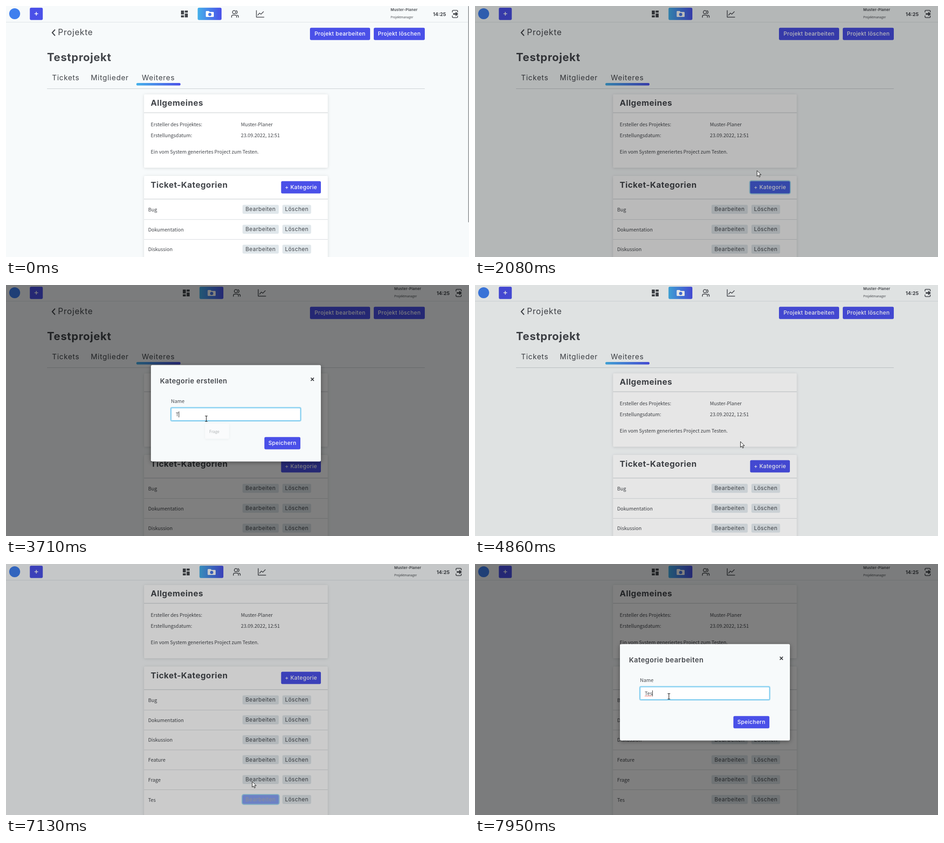
Animation of 1016 by 551 pixels, one loop 8000 ms. Source, as an HTML page:

```html
<!DOCTYPE html>
<html lang="de">
<head>
<meta charset="utf-8">
<title>Ticket-Kategorien</title>
<style>
  html, body { margin: 0; width: 100%; height: 100%; overflow: hidden; background: #f7fafb; }
  svg { display: block; width: 100%; height: 100%; }
  text { font-family: Inter, sans-serif; fill: #43464b; letter-spacing: .05em; white-space: pre; }
  .body { font-family: "Noto Sans CJK JP", "Noto Sans CJK SC", "Noto Sans CJK", "Noto Sans", sans-serif; letter-spacing: 0; }
  .bold { font-weight: 700; letter-spacing: .03em; }
  .semi { font-weight: 600; letter-spacing: .036em; }
  .mid { text-anchor: middle; font-weight: 500; letter-spacing: .03em; }
  .small { text-anchor: middle; letter-spacing: .04em; }
  .white { fill: #fff; }
  .card { fill: #fff; filter: drop-shadow(0 1px 3px rgba(0,0,0,.13)); }
  .primary { fill: #4a50e8; }
  .soft { fill: #e0e7eb; }
  .rule { fill: #d6dadc; }
  .glow { fill: none; stroke: #45b5e8; stroke-opacity: .5; stroke-width: 2; }
  .icon { fill: none; stroke: #43464b; stroke-width: 1.5; stroke-linecap: round; stroke-linejoin: round; }
  .pointer { fill: #fff; stroke: #111; stroke-width: 1; stroke-linejoin: round; }
</style>
</head>
<body>
<svg id="stage" viewBox="0 0 1016 551"></svg>
<script>
const rect = (x, y, w, h, cls, r = 0, more = '') =>
  `<rect x="${x}" y="${y}" width="${w}" height="${h}" rx="${r}" class="${cls}" ${more}/>`;
const label = (x, y, size, str, cls = '', more = '') =>
  `<text x="${x}" y="${y}" font-size="${size}" class="${cls}" ${more}>${str}</text>`;
const body = (x, y, str, size = 10.7) => label(x, y, size, str, 'body');
const button = (x, y, w, h, str, id = '') =>
  rect(x, y, w, h, 'primary', 3, id && `id="${id}"`) + label(x + w / 2, y + h / 2 + 4, 12, str, 'mid white');

const categories = ['Bug', 'Dokumentation', 'Diskussion', 'Feature', 'Frage', 'Tes'];
const row = (name, i) => {
  const y = 446.4 + i * 43.7, last = i === 5;
  return `<g ${last ? 'id="newRow"' : ''}>` +
    (i ? rect(303, y - 21.9, 403, 1, 'rule') : '') + body(312, y + 4.6, name) +
    rect(519, y - 9.8, 79.5, 19.6, 'soft', 3, last ? 'id="editBox"' : '') +
    label(558.7, y + 4, 12, 'Bearbeiten', 'small', last ? 'id="editText"' : '') +
    rect(606.5, y - 9.8, 63, 19.6, 'soft', 3) + label(638, y + 4, 12, 'Löschen', 'small') + '</g>';
};

const page = `<g id="page">
  <path d="M107 52.5l-5.5 6 5.5 6" class="icon" style="stroke-width:2.4"/>
  ${label(114, 64, 18, 'Projekte')}
  ${button(667, 47.7, 132, 27, 'Projekt bearbeiten')}${button(807, 47.7, 112, 27, 'Projekt löschen')}
  ${label(90, 121, 24, 'Testprojekt', 'bold')}
  ${label(101, 163, 16, 'Tickets')}${label(186, 163, 16, 'Mitglieder')}${label(298, 163, 16, 'Weiteres')}
  ${rect(90, 181, 829, 1, '', 0, 'fill="#c9ced1"')}
  ${rect(286, 169, 97, 5.6, '', 2.8, 'fill="url(#blue)"')}
  ${rect(303, 194, 403, 161, 'card', 2)}${rect(303, 233.6, 403, 1.5, 'rule')}
  ${label(317.5, 219, 18, 'Allgemeines', 'bold')}
  ${body(317.5, 263.5, 'Ersteller des Projektes:')}${body(515.5, 263.5, 'Muster-Planer')}
  ${body(317.5, 287.5, 'Erstellungsdatum:')}${body(515.5, 287.5, '23.09.2022, 12:51')}
  ${body(317.5, 323.5, 'Ein vom System generiertes Project zum Testen.')}
  ${rect(303, 373, 403, 330, 'card', 2)}${rect(303, 423, 403, 1.5, 'rule')}
  ${label(317.5, 399, 18, 'Ticket-Kategorien', 'bold')}
  ${button(603.7, 384.5, 87.3, 27, '+ Kategorie', 'addBox')}
  ${rect(602.7, 383.5, 89.3, 29, 'glow', 4, 'id="addGlow"')}
  ${categories.map(row).join('')}
  ${rect(518, 654.1, 81.5, 21.6, 'glow', 4, 'id="editGlow"')}
</g>`;

const header = `${rect(0, 0, 1016, 35.5, '', 0, 'fill="#f7fafb"')}${rect(0, 35, 1016, 1, '', 0, 'fill="#dde3e6"')}
  <circle cx="19" cy="17" r="12" fill="#3f7fee"/>
  ${rect(52.3, 3.7, 28.4, 27, 'primary', 3)}<path d="M62.5 17h8M66.5 13v8" stroke="#fff" stroke-width="1.6"/>
  <g id="nav">
    <path d="M384 10h6.6v8.6H384zM384 20.4h6.6V25H384zM392.4 10h6.6v4.6h-6.6zM392.4 16.4h6.6V25h-6.6z" fill="#43464b"/>
    ${rect(420.6, 3.7, 52.4, 27, '', 3, 'fill="url(#blue)"')}
    <path d="M440 11h5l2 2h7.5a1.5 1.5 0 0 1 1.5 1.5V22.5a1.5 1.5 0 0 1-1.5 1.5H440a1.5 1.5 0 0 1-1.5-1.5V12.5A1.5 1.5 0 0 1 440 11z" fill="#fff"/>
    <circle cx="447.3" cy="18.5" r="3.5" fill="#4876e8"/>
    <g class="icon"><circle cx="500.5" cy="13.5" r="3.5"/>
      <path d="M495 25v-2a3 3 0 0 1 3-3h5a3 3 0 0 1 3 3v2M505 10.2a3.5 3.5 0 0 1 0 6.7M507.5 20.2a3 3 0 0 1 2.5 3V25"/>
      <path d="M549.5 10v14.5H566M552.5 20l4-4.500 3 2.5 5.5-5.5"/></g>
  </g>
  <g id="account">
    ${label(844, 10.7, 8, 'Muster-Planer', 'semi')}${body(844, 27, 'Projektmanager', 6.6)}
    ${label(937, 21.7, 10.6, '14:25', 'bold', 'style="letter-spacing:0"')}
    <path class="icon" d="M979.5 13.500v-2a2 2 0 0 1 2-2h7.5a2 2 0 0 1 2 2v2M979.5 21.5v2a2 2 0 0 0 2 2h7.5a2 2 0 0 0 2-2v-2"/>
    <path d="M981 16h5.500v-3.500l6 5-6 5V19H981z" fill="#43464b"/>
  </g>
  ${rect(1014, 0, 2, 475, '', 1, 'id="thumb" fill="#a3a6a8"')}`;

const modal = `${rect(0, 0, 1016, 551, '', 0, 'id="shade"')}
<g id="modal">
  ${rect(318, 175.8, 373, 211.7, '', 3, 'fill="#f7fafb" style="filter:drop-shadow(0 2px 5px rgba(0,0,0,.4))"')}
  ${label(338, 216, 15, '', 'semi', 'id="heading"')}
  <path d="M669 203.7l6.6 6.6m0-6.6l-6.6 6.6" stroke="#33363a" stroke-width="1.9"/>
  ${body(362, 259, 'Name')}
  ${rect(361.3, 268.8, 285.9, 29.9, 'glow', 3, 'id="inputGlow"')}
  ${rect(362.5, 270, 283.5, 27.5, '', 2, 'id="input"')}
  ${label(372.5, 288, 10.7, '', 'body', 'id="value"')}
  <path id="spell" d="M372.5 290.5${'l1.5 -1.5 1.5 1.5'.repeat(5)}" fill="none" stroke="#e0433c" stroke-width=".9"/>
  ${rect(0, 277.5, 1, 13, '', 0, 'id="caret" fill="#222"')}
  ${button(567, 333.7, 79, 27, 'Speichern', 'saveBox')}
  <g id="hint">${rect(437, 304, 52.5, 33.5, 'card', 2)}${body(446, 324.7, 'Frage', 8.8)}</g>
</g>`;

const pointer = `<g id="cursor"><circle id="click" cy="1" r="10" fill="#f2e600" fill-opacity=".6"/>
  <path id="arrow" class="pointer" d="M0 0v12.5l2.9-2.6 1.9 4.3 2-.9-1.9-4.2h4z"/>
  <path id="hand" class="pointer" d="M-1.3 1.2a1.3 1.3 0 0 1 2.7 0v4.6q1.3-.8 2.3.4 1.4-.6 2.2.6 1.8-.4 1.8 1.4v3.3l-1.5 3.5v1H-.8v-1.2l-3.5-4.8q-.5-1.5 1-1.7l2 1.7z"/>
  <path id="beam" d="M-2.8-6h2q.8 0 .8.8 0-.8.8-.8h2M0-5.5V5.5M-2.8 6h2q.8 0 .8-.8 0 .8.8.8h2" fill="none" stroke="#111" stroke-width="1.1"/></g>`;

document.getElementById('stage').innerHTML =
  `<defs><linearGradient id="blue"><stop stop-color="#45b1ea"/><stop offset="1" stop-color="#4a50e8"/></linearGradient></defs>` +
  page + header + modal + pointer;

const el = id => document.getElementById(id);
const set = (id, attrs) => Object.entries(attrs).forEach(([k, v]) => el(id).setAttribute(k, v));
const show = (id, on) => set(id, { opacity: +on });
const ramp = (t, start, length) => Math.min(1, Math.max(0, (t - start) / length));
const within = (t, a, b) => t >= a && t < b;
const mix = (a, b, k) => `rgb(${a.map((v, i) => Math.round(v + (b[i] - v) * k))})`;
const move = (id, x, y) => set(id, { transform: `translate(${x} ${y})` });

const BLUE = [74, 80, 232], SKY = [69, 181, 232], SOFT = [224, 231, 235], INK = [67, 70, 75], WHITE = [255, 255, 255];
const PRESSED = [74, 115, 255];
const OPEN = 2000, CLOSE = 4500, REOPEN = 7070;
const clicks = [1880, 3060, 4430, 6960, 7650];

// time, x, y, shape from here on
const track = [
  [70, 950, 511, 'arrow'], [500, 800, 300, 'arrow'], [780, 690, 176, 'arrow'], [870, 685, 179, 'arrow'],
  [1100, 725, 230, 'arrow'], [1480, 690, 382, 'arrow'], [1600, 675, 394, 'hand'], [1740, 669, 395, 'hand'],
  [2010, 669, 395, 'arrow'], [2200, 535, 305, 'arrow'], [2270, 490, 275, 'beam'], [2290, 483.5, 271, 'beam'],
  [2500, 468, 219, 'arrow'], [2780, 455, 245, 'arrow'], [2900, 445, 275, 'beam'], [3060, 440, 289, 'beam'],
  [3300, 439.5, 293.5, 'beam'], [3950, 439.5, 293.5, 'beam'], [4040, 460, 302, 'arrow'], [4370, 550, 346, 'arrow'],
  [4430, 598, 347, 'hand'], [4600, 597, 347, 'arrow'], [4880, 581.5, 343.5, 'arrow'], [5900, 581.5, 343.5, 'arrow'],
  [6000, 603, 338, 'arrow'], [6250, 653, 407, 'arrow'], [6450, 640, 455, 'arrow'], [6620, 575, 508, 'hand'],
  [6720, 558, 510, 'hand'], [7000, 557, 509, 'hand'], [7060, 552, 499, 'arrow'], [7130, 540.5, 478, 'arrow'],
  [7400, 470, 350, 'arrow'], [7520, 430, 294, 'beam'], [7690, 425.5, 290.5, 'beam'], [8000, 425.5, 290.5, 'beam']
];

function drawCursor(t) {
  show('cursor', t >= 70);
  if (t < 70) return;
  const i = track.findIndex(k => k[0] > t) - 1;
  const [t0, x0, y0, shape] = track[i], [t1, x1, y1] = track[i + 1];
  const k = (t - t0) / (t1 - t0);
  move('cursor', x0 + (x1 - x0) * k, y0 + (y1 - y0) * k);
  ['arrow', 'hand', 'beam'].forEach(id => show(id, id === shape));
  show('click', clicks.some(c => within(t, c, c + 120)));
}

function drawModal(t) {
  const editing = t >= REOPEN, start = editing ? REOPEN : OPEN;
  const leave = editing ? 0 : ramp(t, CLOSE, 175);
  const slide = (1 - ramp(t, start + 150, 300)) ** 1.7 + (editing ? 0 : ramp(t, CLOSE, 300) ** 1.7);
  const shade = ramp(t, start, 150) - (editing ? 0 : ramp(t, CLOSE + 240, 150));
  set('shade', { opacity: shade / 2 });
  show('modal', ramp(t, start + 150, 175) - leave);
  move('modal', 0, -50 * slide);

  const locked = shade > 0;
  move('nav', locked ? 4 : 0, 0);
  move('account', locked ? 8 : 0, 0);
  show('thumb', !locked);

  const focused = within(t, 3090, CLOSE) || t >= 7680;
  const typed = [3640, 3850, 4000].filter(key => t >= key).length;
  el('heading').textContent = editing ? 'Kategorie bearbeiten' : 'Kategorie erstellen';
  el('value').textContent = 'Tes'.slice(0, editing ? 3 : typed);
  set('input', { fill: focused ? '#fff' : '#f9fbfc', stroke: focused ? '#5dc0ee' : '#ced4da' });
  show('inputGlow', focused);
  show('caret', focused);
  set('caret', { x: 372.5 + el('value').getComputedTextLength() });
  show('spell', editing && focused);
  show('hint', t < 3120 ? 0 : 1 - ramp(t, 3640, 115));
  set('saveBox', { style: `fill:${mix(BLUE, SKY, within(t, 4420, 4600))}` });
  show('addGlow', within(t, OPEN, 3090));
  show('editGlow', within(t, 6990, 7680));
}

function draw(t) {
  const s = ramp(t, 5390, 250), scroll = 148 * s * s * (3 - 2 * s), saved = t >= CLOSE;
  move('page', 0, -scroll);
  show('newRow', saved);
  set('thumb', { y: scroll * .79, height: saved ? 434 : 475 });
  const add = ramp(t, 1590, 100) - ramp(t, OPEN, 100);
  set('addBox', { style: `fill:${mix(BLUE, SKY, add)}` });
  const edit = ramp(t, 6620, 120) - ramp(t, 7070, 150);
  set('editBox', { style: `fill:${mix(SOFT, PRESSED, edit)}` });
  set('editText', { style: `fill:${mix(INK, WHITE, edit)}` });
  drawModal(t);
  drawCursor(t);
}

function tick() {
  draw(performance.now() % 8000);
  requestAnimationFrame(tick);
}
tick();
</script>
</body>
</html>
```
